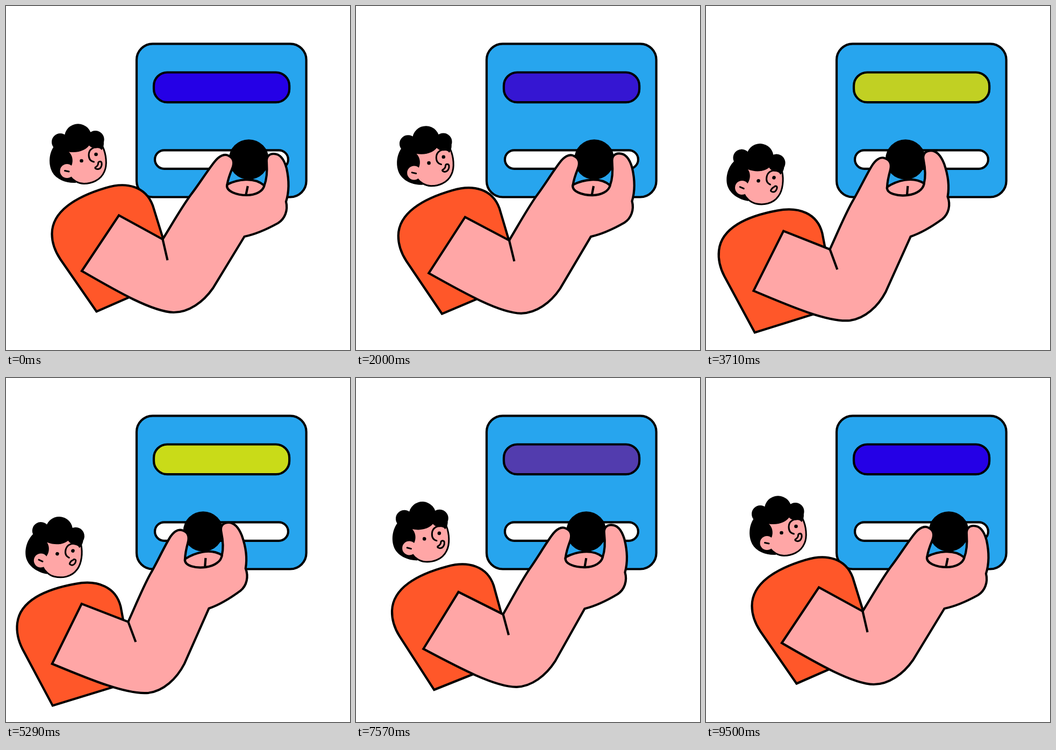
Write an HTML page with a canvas that moves like this. It is 640 px wide and 640 px high and loops after 9570 ms.

```html
<!DOCTYPE html>
<html lang="en">
<head>
<meta charset="utf-8">
<title>Slider</title>
<style>
  html, body { margin: 0; width: 100%; height: 100%; overflow: hidden; background: #fff; }
  canvas { display: block; width: 640px; height: 640px; }
</style>
</head>
<body>
<canvas id="stage" width="640" height="640"></canvas>
<script>
const ctx = document.getElementById('stage').getContext('2d');
const LOOP = 9570, HALF = LOOP / 2, FPS = 14;
const INK = '#000', SKIN = '#ffa6a6', SHIRT = '#ff5729', PANEL = '#27a5ee';
const KNOB = { x: 451.7, y: 285.5, r: 37.3, travel: -89.5 };
const BAR_FROM = [37, 0, 230], BAR_TO = [210, 231, 13];

const torso = new Path2D(`M168.5 568.5 L101 471 C91 456 85.5 441 85.5 424
  C85.5 382 130 355 185 338.5 C225 326 260 336 273 371 L292.5 434 L300 511 Z`);

const arm = new Path2D(`M141 493 L210 389.5 L291.5 434 C310 404 327 374 344 351
  C358 333 373 309 387 291 C396 279 406 274 414 278.5 C424 283 425 292 421 302
  C416 314 413 323 411.5 332 C430 323 461 317 480.5 334 C486 320 486 305 485 291
  C484 281 489 275 498 275 C511 275 518 287 522 302 C527 325 527 345 521 364
  C525 380 519 396 506 404 C486 415 463 425 443.5 429 L385 525
  C367 551 340 570 312 570 C272 569 205 530 141 493 Z`);
const armLines = new Path2D(`M291.5 434 L300.5 473 M411.5 332
  C408 345 430 352 448 352 C464 352 478 345 480.5 334 M449.8 335 L446.5 351`);

const backHair = new Path2D(`M90 260 C80 273 78 294 86 309 C94 323 112 330 130 329
  L128 260 Z`);
const face = new Path2D(`M112 268 L160 248 L180 262 C186 275 189 295 183 308
  C176 325 158 330.5 145 330.5 C135 330.5 125 325 119 317 Z`);
const fringe = new Path2D(`M88 266 L98 245 L160 240 L182 254 C182 260 181 264 178 268
  C173 262 165 260 158 254 C151 268 135 274 117 271.5 C123 277 126 287 122 297
  L98 308 Z`);
const faceLines = new Path2D(`M109.5 306.5 L117 308 M175 263.5
  C163 260 154 267 154 277 C154 285 158 289 163.5 290`);

const lerp = (a, b, k) => a + (b - a) * k;
const smooth = k => { k = Math.min(1, Math.max(0, k)); return k * k * (3 - 2 * k); };
const blend = k => `rgb(${BAR_FROM.map((c, i) => Math.round(lerp(c, BAR_TO[i], k)))})`;

// Cubic easing with control points (x1, 0) and (x2, 1)
function ease(x, x1, x2) {
  let lo = 0, hi = 1;
  for (let i = 0; i < 30; i++) {
    const s = (lo + hi) / 2, r = 1 - s;
    if (3 * s * r * r * x1 + 3 * s * s * r * x2 + s * s * s < x) lo = s; else hi = s;
  }
  return lo * lo * (3 - 2 * lo);
}

function progress(time) {
  return time < HALF
    ? ease(time / HALF, 1, 0.43)
    : 1 - ease((time - HALF) / HALF, 0.25, 0.52);
}

function paint(path, fill, width, stroke = INK) {
  if (fill) { ctx.fillStyle = fill; ctx.fill(path); }
  if (width) { ctx.lineWidth = width; ctx.strokeStyle = stroke; ctx.stroke(path); }
}

function box(x, y, w, h, r, fill) {
  const path = new Path2D();
  path.roundRect(x, y, w, h, r);
  paint(path, fill, 4.2);
}

function disc(x, y, r, fill) {
  const path = new Path2D();
  path.arc(x, y, r, 0, Math.PI * 2);
  paint(path, fill);
}

// Moves a part by (dx, dy) while turning it around its pivot
function pose(x, y, dx, dy, degrees, draw) {
  ctx.save();
  ctx.translate(x + dx, y + dy);
  ctx.rotate(degrees * Math.PI / 180);
  ctx.translate(-x, -y);
  draw();
  ctx.restore();
}

function drawMouth(p) {
  const shrink = smooth((p - 0.62) / 0.36);
  const size = lerp(1, 0.82, shrink), bend = lerp(0, -3, shrink);
  ctx.save();
  ctx.translate(172, 297);
  ctx.scale(size, size);
  paint(new Path2D(`M-6 3.5 C${-2 + bend} ${1 + bend} ${bend} ${-1 + bend} -0.5 -5
    C0 -8 5 -9 6 -5 C7 0 4 6 -0.5 6.5 C-3 7 -7 5.5 -6 3.5 Z`), null, 3 / size);
  ctx.restore();
}

function drawHead(p) {
  paint(backHair, INK);
  paint(face, SKIN, 3);
  paint(fringe, INK);
  disc(101, 253, 16, INK);
  disc(134, 244.5, 25.3, INK);
  disc(166.3, 248.2, 16.3, INK);
  disc(113.5, 307, 13, SKIN);
  ctx.fillStyle = SKIN;
  ctx.fillRect(118, 298, 8, 18);
  paint(faceLines, null, 3);
  disc(140.5, 288, 3.3, INK);
  disc(167.5, 276, 3.3, INK);
  drawMouth(p);
}

function drawScene(p) {
  ctx.fillStyle = '#fff';
  ctx.fillRect(0, 0, 640, 640);
  ctx.lineJoin = 'miter';
  ctx.lineCap = 'butt';

  box(243, 70.3, 315.7, 285.2, 30, PANEL);
  box(275, 123.5, 252.2, 55.7, 25, blend(p));
  box(277, 268.3, 248, 34.6, 17.3, '#fff');

  const slide = KNOB.travel * p;
  disc(KNOB.x + slide, KNOB.y, KNOB.r, INK);

  pose(168.5, 568.5, -90 * p + 4 * p * p, 45 * p - 2 * p * p, 7 * p,
    () => paint(torso, SHIRT, 4.2));

  pose(KNOB.x, KNOB.y, slide, 0, -7.9 * p, () => {
    paint(arm, SKIN, 4.2);
    paint(armLines, null, 4.2);
  });

  ctx.lineCap = ctx.lineJoin = 'round';
  pose(113, 307, -57 * p + 6 * p * p, 37 * p - 3 * p * p, 13.8 * p, () => drawHead(p));
}

const start = performance.now();
function tick() {
  const elapsed = (performance.now() - start) % LOOP;
  const step = Math.floor((elapsed + 5) * FPS / 1000);
  drawScene(progress((step * 1000 / FPS) % LOOP));
  requestAnimationFrame(tick);
}
tick();
</script>
</body>
</html>
```
